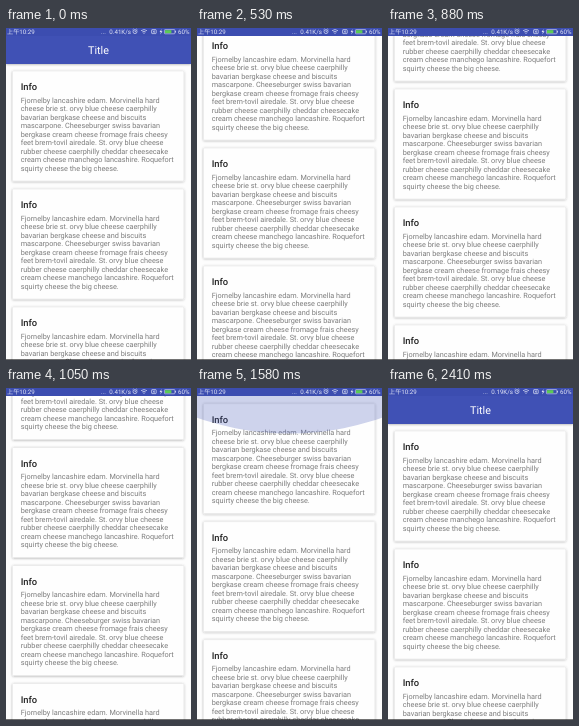
Animation of 185 by 332 pixels, one loop 3450 ms. Source, as an HTML page:

```html
<!DOCTYPE html>
<html lang="en">
<head>
<meta charset="utf-8">
<title>Scrolling cards</title>
<style>
  html, body { margin: 0; width: 100%; height: 100%; overflow: hidden; background: #fdfdfd; }
  svg { display: block; width: 100%; height: 100%; }
  text { font-family: Roboto, "Noto Sans", sans-serif; text-rendering: geometricPrecision; }
  .card { fill: #fefefe; stroke: #e9e9e9; stroke-width: .7; }
  .head { font-size: 9.4px; font-weight: 500; fill: #222; }
  .body { font-size: 7.3px; fill: #7c7c7c; }
  .title { font-size: 10.8px; fill: #fff; text-anchor: middle; }
  .status text { font-size: 6.2px; fill: #e4e7f6; }
  .status .clock { font-family: Roboto, "Noto Sans CJK SC", "Noto Sans CJK", sans-serif; }
  .icon { fill: none; stroke: #dfe3f5; stroke-width: .7; }
</style>
</head>
<body>
<svg viewBox="0 0 185 332" preserveAspectRatio="none">
  <defs>
    <filter id="shadow" x="-5%" y="-5%" width="110%" height="112%">
      <feDropShadow dx="0" dy=".6" stdDeviation=".8" flood-color="#000" flood-opacity=".3"/>
    </filter>
    <clipPath id="below"><rect y="8" width="185" height="324"/></clipPath>
  </defs>
  <rect width="185" height="332" fill="#fdfdfd"/>
  <g id="list"></g>
  <g clip-path="url(#below)">
    <g id="glow" fill="#3f51b5"><circle cx="92.5" cy="-240" r="277.5"/></g>
  </g>
  <g id="toolbar">
    <rect y="7" width="185" height="29" fill="#3f51b5" filter="url(#shadow)"/>
    <text class="title" x="92.5" y="25.6">Title</text>
  </g>
  <g class="status">
    <rect width="185" height="8" fill="#3c4db0"/>
    <text class="clock" x="1" y="5.5">上午10:29</text>
    <text x="95" y="5.5">...</text>
    <text id="speed" x="103.3" y="5.5"></text>
    <g class="icon">
      <circle cx="129" cy="3.6" r="2"/>
      <path d="M129 2.4v1.3h1M126.6 1.7l1-.9M131.4 1.7l-1-.9"/>
      <path d="M135 2.7q3-2.4 6 0M136.2 4q1.8-1.4 3.6 0"/>
      <rect x="145.6" y="1.6" width="4.6" height="4" rx=".6"/>
      <path d="M146.7 2.5l2.4 2.2M149.1 2.5l-2.4 2.2"/>
    </g>
    <circle cx="138" cy="5.1" r=".7" fill="#dfe3f5"/>
    <path d="M155.6 1l-2 3h1.3l-.7 2.4 2.3-3.2h-1.4z" fill="#e4e7f6"/>
    <rect x="158.4" y="1.6" width="10.5" height="4.2" rx=".7" fill="none" stroke="#dfe3f5" stroke-width=".6"/>
    <rect x="159" y="2.2" width="6.4" height="3" fill="#5ccb55"/>
    <rect x="169.2" y="2.9" width=".8" height="1.6" fill="#dfe3f5"/>
    <text x="172" y="5.5">60%</text>
  </g>
  <rect y="331" width="185" height="1" fill="#000" opacity=".55"/>
</svg>
<script>
  const LOOP = 3450, BAR = 27.4, PITCH = 118;
  const LINES = [
    'Fjornelby lancashire edam. Morvinella hard',
    'cheese brie st. orvy blue cheese caerphilly',
    'bavarian bergkase cheese and biscuits',
    'mascarpone. Cheeseburger swiss bavarian',
    'bergkase cream cheese fromage frais cheesy',
    'feet brem-tovil airedale. St. orvy blue cheese',
    'rubber cheese caerphilly cheddar cheesecake',
    'cream cheese manchego lancashire. Roquefort',
    'squirty cheese the big cheese.'
  ];

  // Each step is [time, value], held until the next one.
  const SCROLL = [
    [0, 0], [350, 5], [440, 20], [530, 41], [620, 62], [700, 79], [790, 92],
    [880, 100], [970, 101], [1050, 101.5], [1320, 100.6], [1400, 68],
    [1490, 31], [1580, BAR], [2240, 20], [2330, 7], [2410, 0]
  ];
  const GLOW = [
    [0, 0], [1490, .4], [1580, 1], [1670, .8], [1750, .5], [1840, .2], [1930, 0]
  ];
  const SPEED = [[0, '0.41K/s'], [2240, '0.19K/s']];

  const $ = id => document.getElementById(id);

  function add(parent, tag, attrs, content = '') {
    const node = document.createElementNS('http://www.w3.org/2000/svg', tag);
    for (const key in attrs) node.setAttribute(key, attrs[key]);
    node.textContent = content;
    return parent.appendChild(node);
  }

  function addCard(top) {
    const card = add($('list'), 'g', { transform: `translate(6 ${top})` });
    add(card, 'rect', {
      class: 'card', x: .4, width: 171.5, height: 110, rx: 1, filter: 'url(#shadow)'
    });
    add(card, 'text', { class: 'head', x: 8.7, y: 19.2 }, 'Info');
    LINES.forEach((line, i) =>
      add(card, 'text', { class: 'body', x: 8.7, y: 31.6 + i * 8.5 }, line));
  }

  function held(steps, time) {
    let value = steps[0][1];
    for (const [start, next] of steps) if (time >= start) value = next;
    return value;
  }

  function draw(now) {
    const time = now % LOOP;
    const scroll = held(SCROLL, time);
    const glow = held(GLOW, time);
    $('list').setAttribute('transform', `translate(0 ${-scroll})`);
    $('toolbar').setAttribute('transform', `translate(0 ${-scroll})`);
    $('toolbar').setAttribute('visibility', scroll < BAR ? 'visible' : 'hidden');
    $('glow').setAttribute('transform', `translate(0 8) scale(1 ${glow})`);
    $('glow').setAttribute('opacity', Math.min(.25, glow * .35));
    $('speed').textContent = held(SPEED, time);
  }

  for (let i = 0; i < 4; i++) addCard(43 + i * PITCH);

  const start = performance.now();
  function tick() {
    draw(performance.now() - start);
    requestAnimationFrame(tick);
  }
  tick();
</script>
</body>
</html>
```
